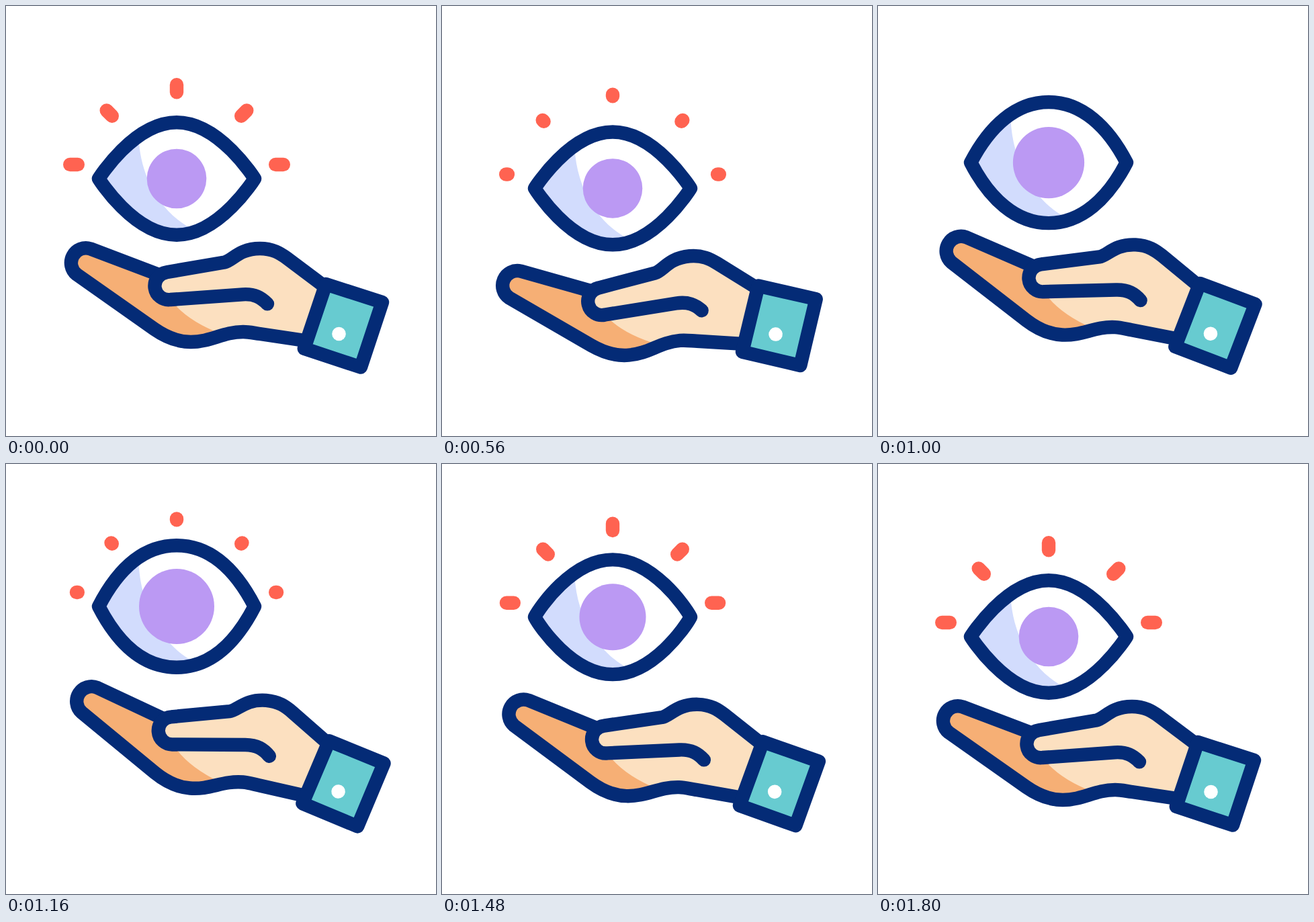
An HTML page that plays this animation: 640x640 px, repeating every 2.08 s.

```html
<!DOCTYPE html>
<html lang="en">
<head>
<meta charset="utf-8">
<title>Eye above an open hand</title>
<style>
  html, body { margin: 0; width: 100%; height: 100%; overflow: hidden; background: #fff; }
  svg { display: block; width: 100vw; height: 100vh; }
  .line { stroke: #042b76; stroke-width: 20.4; stroke-linecap: round; stroke-linejoin: round; fill: none; }
  #rays { stroke: #ff6351; stroke-width: 20.4; stroke-linecap: round; }
</style>
</head>
<body>
<svg viewBox="0 0 640 640">
  <defs><clipPath id="lidClip"><path class="lid"/></clipPath></defs>
  <g id="hand">
    <path id="skin" fill="#fce0c0"/>
    <path fill="#f6af75" d="M245 437Q268 468 320 488L275 500C257 500 239 493.5 221 481L105.2 399.5A22 22 0 0 1 125.8 361.4L229 400.5L222 416Z"/>
    <path id="palm" class="line"/>
    <path id="thumb" class="line"/>
    <path class="line" style="fill:#67cbd0" d="M476 414L560 441L528 537.6L443.8 509.8Z"/>
    <circle cx="495.5" cy="488" r="10.3" fill="#fff"/>
  </g>
  <g id="eye">
    <g clip-path="url(#lidClip)">
      <path id="shade" fill="#d2dcfd" d="M-56.5 -60C-54 -2 -22 56 30 78L30 110H-130V-80H-56.5Z"/>
    </g>
    <circle id="iris" fill="#bb99f3"/>
    <path class="lid line"/>
    <g id="rays"></g>
  </g>
</svg>
<script>
const LOOP = 2080, STEP = 40, LID = 83.8, LID_OPEN = 90.8;
const $ = id => document.getElementById(id);
const set = (el, attrs) => { for (const k in attrs) el.setAttribute(k, attrs[k]); };

const palm = 'M445 498L378 488C370 487 362 485 353 485C322 485 306 500 275 500' +
  'C257 500 239 493.5 221 481L105.2 399.5A22 22 0 0 1 125.8 361.4L229 400.5';
const hump = 'L325 381.5C337 379 347 361 378 361C397 361 408 368 418 375.3L471 415';
set($('palm'), { d: palm });
set($('skin'), { d: palm + 'L239 396.3' + hump + 'Z' });
set($('thumb'), { d: 'M389 443.3C380 434 370 428 352 429.3L245 437A20.5 20.5 0 0 1 239 396.3' + hump });

// Each ray runs from its inner end to its outer end, relative to the eye centre.
const rays = [
  [0, -128.7, 0, -139.7],
  ...[-1, 1].flatMap(s => [
    [s * 147.2, -21, s * 158.8, -21],
    [s * 96.2, -93.3, s * 104.3, -101.5]
  ])
].map(ends => {
  const el = document.createElementNS('http://www.w3.org/2000/svg', 'line');
  $('rays').append(el);
  return { el, ends };
});

const tracks = {
  tilt: [[40, 0], [540, -5], [708, -5], [1112, 4.4], [1160, 4.4], [1683, 0]],
  lift: [[157, 0], [657, 16], [772, 16], [1149, -45], [1268, -45], [1800, 0]],
  iris: [[648, 44.3], [1168, 56], [1750, 44.3]],
  open: [[520, 0], [1120, 1], [1640, 0]]
};

const clamp = u => Math.min(1, Math.max(0, u));
const mix = (a, b, u) => a + (b - a) * u;

function valueAt(keys, t) {
  let value = keys[0][1];
  for (let i = 1; i < keys.length; i++) {
    const [t0, v0] = keys[i - 1], [t1, v1] = keys[i];
    if (t < t0) break;
    const u = clamp((t - t0) / (t1 - t0));
    value = mix(v0, v1, u * u * (3 - 2 * u));
  }
  return value;
}

// The lids get rounder as well as taller while the eye opens.
function lidPath(open, h) {
  const cornerX = mix(116, 85, open), cornerY = mix(0, 60, open), topX = mix(64, 47, open);
  const half = (s, v) =>
    `C${-s * cornerX} ${v * cornerY} ${-s * topX} ${v * h} 0 ${v * h}` +
    `C${s * topX} ${v * h} ${s * cornerX} ${v * cornerY} ${s * 116} 0`;
  return 'M-116 0' + half(1, -1) + half(-1, 1) + 'Z';
}

function drawRays(t) {
  const from = t < 1120 ? clamp((t - 140) / 480) ** 2 : 0;
  const to = t < 1120 ? 1 : 1 - (1 - clamp((t - 1120) / 480)) ** 2;
  $('rays').style.display = to > from ? '' : 'none';
  for (const { el, ends: [x0, y0, x1, y1] } of rays) {
    set(el, {
      x1: mix(x0, x1, from), y1: mix(y0, y1, from),
      x2: mix(x0, x1, to), y2: mix(y0, y1, to)
    });
  }
}

function draw(t) {
  const open = valueAt(tracks.open, t);
  const height = mix(LID, LID_OPEN, open);
  const d = lidPath(open, height);
  document.querySelectorAll('.lid').forEach(el => set(el, { d }));
  set($('shade'), { transform: `scale(1 ${height / LID})` });
  set($('iris'), { r: valueAt(tracks.iris, t) });
  set($('eye'), { transform: `translate(254 ${257 + valueAt(tracks.lift, t)})` });
  set($('hand'), { transform: `rotate(${valueAt(tracks.tilt, t)} 502 476)` });
  drawRays(t);
}

const start = performance.now();
function tick() {
  const t = (performance.now() - start) % LOOP;
  draw(Math.floor(t / STEP) * STEP);
  requestAnimationFrame(tick);
}
tick();
</script>
</body>
</html>
```
